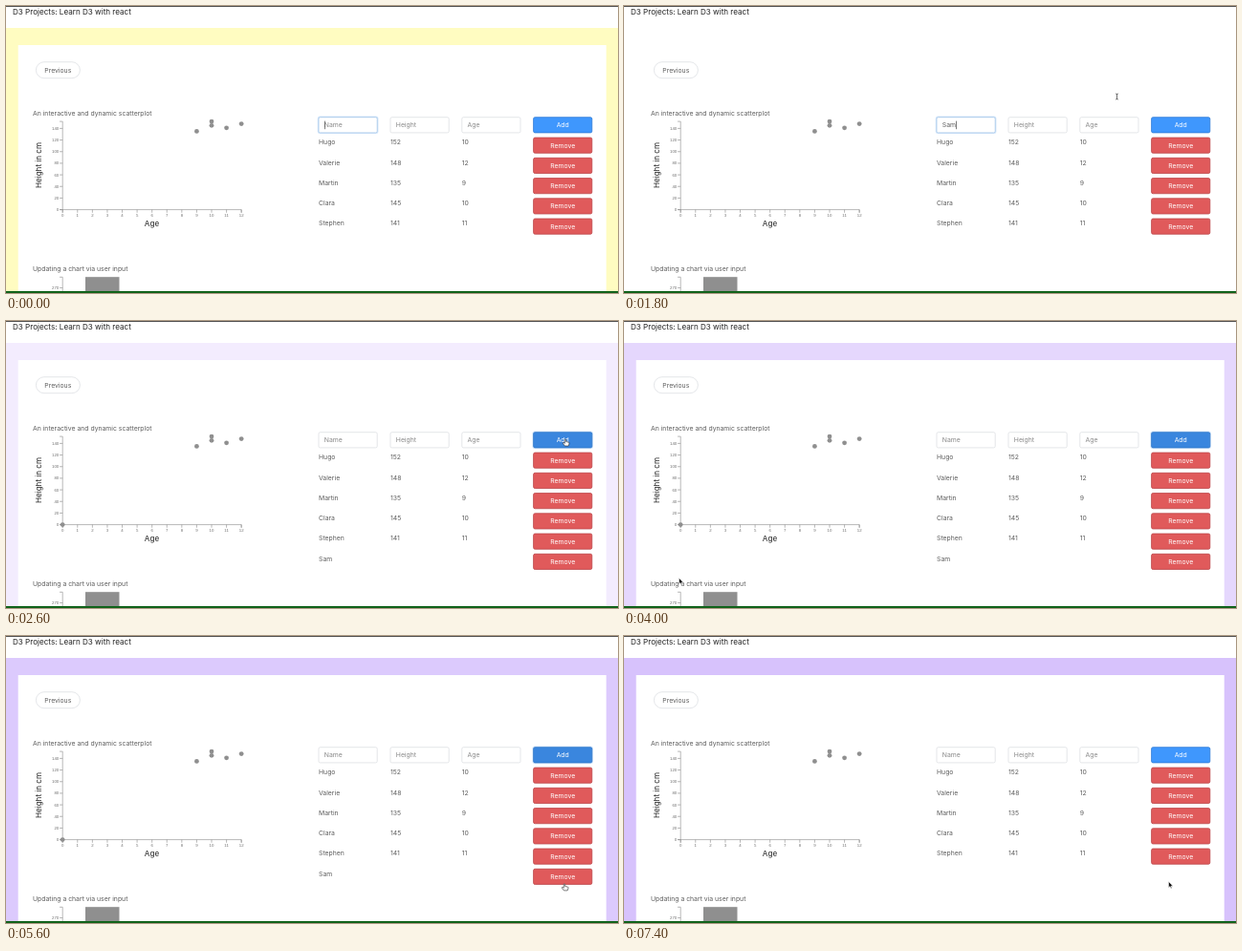
These frames come from a looping animation (640x301 px, 7.5 s). An HTML page:

```html
<!DOCTYPE html>
<html lang="en">
<head>
<meta charset="utf-8">
<title>Scatterplot demo</title>
<style>
html, body { margin: 0; width: 100%; height: 100%; overflow: hidden; background: #fff; }
svg { display: block; width: 640px; height: 301px; }
text { font: 6.85px Inter, sans-serif; fill: #5c5c5c; }
text.big { font-size: 8.1px; fill: #222; }
text.tick { font: 4.3px "Liberation Sans", Arial, sans-serif; fill: #6a6a6a; }
text.hint { fill: #888; }
text.white { fill: #fff; }
.mid { text-anchor: middle; }
.end { text-anchor: end; }
.axis { fill: none; stroke: #888; stroke-width: .6; }
.field { fill: #fff; stroke: #d9dce0; stroke-width: .7; }
.focus { stroke: #9cc0e6; }
.halo { fill: #d3e6fa; }
.red { fill: #e05a5b; stroke: #bd4649; stroke-width: .8; }
.blue { fill: #3f97fd; stroke: #2f7cd6; stroke-width: .8; }
.blue.active { fill: #3a86de; stroke: #3278c8; }
.gray { fill: #8f8f8f; }
</style>
</head>
<body>
<svg id="stage" viewBox="0 0 640 301"></svg>
<script>
const LOOP = 7500, ADDED = 2400, REMOVED = 6800, EXIT = 300, KEY_DELAY = 250;
const COLUMNS = [327, 402, 476.8], BUTTON_X = 551.6, WIDTH = 61.2;
const FORM_Y = 116.7, ROW_STEP = 21.25;
const people = [
  ["Hugo", 152, 10], ["Valerie", 148, 12], ["Martin", 135, 9],
  ["Clara", 145, 10], ["Stephen", 141, 11]
];
const newcomer = "Sam";
const stage = document.getElementById("stage");

function add(tag, attrs, parent = stage) {
  const el = document.createElementNS("http://www.w3.org/2000/svg", tag);
  for (const key in attrs) el.setAttribute(key, attrs[key]);
  return parent.appendChild(el);
}
function label(x, y, string, cls = "", parent = stage) {
  const el = add("text", { x, y, class: cls }, parent);
  el.textContent = string;
  return el;
}
const box = (x, y, width, height, cls, rx = 1.6, parent = stage) =>
  add("rect", { x, y, width, height, rx, class: cls }, parent);
const halo = x => box(x - 1.2, FORM_Y - 1.2, WIDTH + 2.4, 18.6, "halo", 2.5);
const line = d => add("path", { d, class: "axis" });
const show = (el, on) => el.setAttribute("visibility", on ? "visible" : "hidden");

// Page
const sky = add("rect", { y: 23, width: 640, height: 276 });
add("rect", { x: 12.7, y: 41, width: 615, height: 258, fill: "#fff" });
add("rect", { width: 640, height: 1, fill: "#555" });
label(7, 8.5, "D3 Projects: Learn D3 with react", "big");
box(31.4, 58.7, 46, 17, "field", 8.5);
label(54.3, 70, "Previous", "mid");
label(28, 114.8, "An interactive and dynamic scatterplot");
label(28, 277.6, "Updating a chart via user input");

// Scatterplot
const px = age => 59.2 + age * 15.58;
const py = height => 213.6 - height * .6086;
const dot = (age, height) => add("circle", { cx: px(age), cy: py(height), r: 2.4, class: "gray" });
line(`M56 ${py(152)}H59.2V${py(0)}H56M59.2 216.8V${py(0)}H${px(12)}V216.8`);
for (let age = 0; age <= 12; age++) {
  line(`M${px(age)} ${py(0)}v3.2`);
  label(px(age), 221, age, "tick mid");
}
for (let height = 0; height <= 140; height += 20) {
  line(`M59.2 ${py(height)}h-3.2`);
  label(55.2, py(height) + 1.5, height, "tick end");
}
label(152.5, 231.4, "Age", "big mid");
label(0, 0, "Height in cm", "big mid").setAttribute("transform", "translate(36.5 167) rotate(-90)");
people.forEach(([, height, age]) => dot(age, height));
const newDot = dot(0, 0);

// Top of the bar chart
line("M56 284.3H59.2V299M59.2 295.6h-3.2");
label(55.2, 297.2, 270, "tick end");
box(83, 284.2, 35.5, 15, "gray", 0);

// Form
const nameHalo = halo(COLUMNS[0]), addHalo = halo(BUTTON_X);
const [name] = ["Name", "Height", "Age"].map((hint, i) => ({
  field: box(COLUMNS[i], FORM_Y, WIDTH, 16.2, "field"),
  text: label(COLUMNS[i] + 5.8, FORM_Y + 10.7, hint, "hint")
}));
const caret = add("rect", { y: 120.6, width: .7, height: 8.6, fill: "#444" });
const addButton = box(BUTTON_X, FORM_Y, WIDTH, 16.2, "blue");
label(BUTTON_X + WIDTH / 2, FORM_Y + 10.7, "Add", "white mid");

// Table
function row(values, i) {
  const g = add("g", { transform: `translate(0 ${FORM_Y + (i + 1) * ROW_STEP})` });
  values.forEach((value, k) => label(COLUMNS[k], 7.5, value, "", g));
  box(BUTTON_X, .1, WIDTH, 16.2, "red", 1.6, g);
  label(BUTTON_X + WIDTH / 2, 10.8, "Remove", "white mid", g);
  return g;
}
people.forEach(row);
const newRow = row([newcomer], people.length);
add("rect", { y: 299, width: 640, height: 2, fill: "#10621a" });

// Mouse pointers, each with its hot spot at 0,0
const pointers = {
  arrow: add("path", { d: "M0 0V6.4L1.5 5.1 2.5 7.3 3.5 6.9 2.5 4.7H4.5Z", fill: "#111", stroke: "#fff", "stroke-width": .5 }),
  beam: add("path", { d: "M-1.3-3Q0-3 0-2.2Q0-3 1.3-3M0-2.4V2.4M-1.3 3Q0 3 0 2.2Q0 3 1.3 3", fill: "none", stroke: "#333", "stroke-width": .7 }),
  hand: add("path", { d: "M-.7.4Q0-.6.7.4V2.6L3.5 3.2Q4.3 3.6 3.9 5L3.2 7H-.6L-2.6 4.4Q-2.7 3.2-1.7 3.6L-.7 4.4Z", fill: "#fff", stroke: "#222", "stroke-width": .6 })
};

// Where the mouse turns or rests, with easing in between
const stops = [
  { at: 1600, x: 352, y: 126 }, { at: 1800, x: 515.5, y: 95 },
  { at: 2300, x: 585, y: 124 }, { at: 2900, x: 585, y: 124 },
  { at: 4000, x: 57.5, y: 269.5 }, { at: 4400, x: 62, y: 217 },
  { at: 5500, x: 584, y: 260 }, { at: 6800, x: 584, y: 255 },
  { at: 7100, x: 602, y: 208 }, { at: 7400, x: 569.5, y: 257.5 }
];
const clamp = u => Math.min(1, Math.max(0, u));
const ease = u => u * u * (3 - 2 * u);

function mouseAt(t) {
  const next = Math.max(1, stops.findIndex(stop => stop.at >= t));
  const a = stops[next - 1], b = stops[next];
  const u = ease(clamp((t - a.at) / (b.at - a.at)));
  return [a.x + (b.x - a.x) * u, a.y + (b.y - a.y) * u];
}
function pointerAt(x, y, t, added) {
  const buttons = people.length + 1 + added;
  const depth = y - FORM_Y;
  const onButton = x > BUTTON_X && x < BUTTON_X + WIDTH &&
    depth > 0 && depth < buttons * ROW_STEP && depth % ROW_STEP < 17;
  if (onButton) return "hand";
  return t < 2100 ? "beam" : "arrow";
}
// Yellow fades to white, then violet settles in
function skyColor(t) {
  const yellow = clamp(1 - t / 1400);
  const violet = 1 - Math.exp(-Math.max(0, t - 1800) / 2400);
  return `rgb(${255 - 44 * violet},${255 - 3 * yellow - 67 * violet},${255 - 62 * yellow - 3 * violet})`;
}

function draw(now) {
  const t = Math.floor(now % LOOP / 100) * 100;
  const editing = t < ADDED;
  const added = t >= ADDED && t < REMOVED;
  sky.setAttribute("fill", skyColor(t));

  const typed = editing ? newcomer.slice(0, Math.floor(t / KEY_DELAY)) : "";
  name.text.textContent = typed || "Name";
  name.text.classList.toggle("hint", !typed);
  name.field.classList.toggle("focus", editing);
  show(nameHalo, editing);
  show(caret, editing);
  caret.setAttribute("x", 333 + (typed && name.text.getComputedTextLength()));

  show(addHalo, added);
  addButton.classList.toggle("active", added);
  show(newRow, added);
  show(newDot, t >= ADDED && t < REMOVED + EXIT);

  const [x, y] = mouseAt(t), kind = pointerAt(x, y, t, added);
  for (const key in pointers) {
    show(pointers[key], key === kind && t >= stops[0].at);
    pointers[key].setAttribute("transform", `translate(${x} ${y})`);
  }
}
const start = performance.now();
function frame() {
  draw(performance.now() - start);
  requestAnimationFrame(frame);
}
frame();
</script>
</body>
</html>
```
